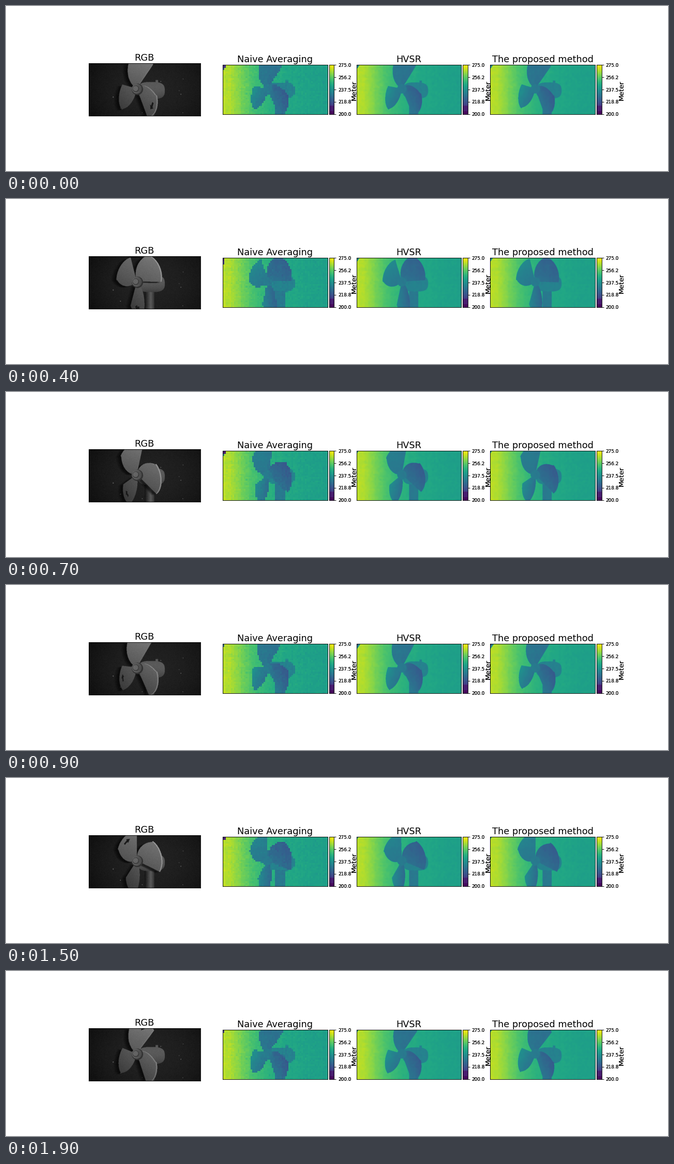
A matplotlib script for the animation above (2000 ms loop, 1280 px wide and 320 px high).

```python
import numpy as np
import matplotlib.pyplot as plt
from matplotlib.animation import FuncAnimation
from matplotlib.path import Path

STAGE_W, STAGE_H = 1280, 320
FRAMES, STEP = 20, 12.8            # frames per loop, degrees turned per frame
CELLS_X, CELLS_Y, SUB = 64, 30, 7  # coarse sensor grid and its subdivision
NX, NY = CELLS_X * SUB, CELLS_Y * SUB
VIEW_W, VIEW_H = 216, 101          # scene units
HUB_X, HUB_Y = 93, 48.7
MID_ANGLE = 81                     # middle of a blade, degrees

gx, gy = np.meshgrid((np.arange(NX) + 0.5) * VIEW_W / NX,
                     (np.arange(NY) + 0.5) * VIEW_H / NY)
GRID = np.column_stack([gx.ravel(), gy.ravel()])


def blade_outline(lead=52, trail=109):
    """Polar outline: straight leading edge, rounded rim, swept trailing edge."""
    r_lead = np.linspace(8, 55, 6)
    rim = np.linspace(lead, trail, 12)
    r_back = np.linspace(56, 10, 8)
    angle = np.concatenate([np.full(6, lead), rim, 104 + 50 * (1 - r_back / 63)])
    r = np.concatenate([r_lead, 63 - 6 * ((rim - 84) / 30) ** 2, r_back])
    return angle, r


def arrow_outline(angle=MID_ANGLE, r=50):
    along = np.array([10, 10, 0, 0, -9, 0, 0])
    across = np.array([-2, 2, 2, 5, 0, -5, -2])
    return angle + along, r + across


def inside(points):
    return Path(points).contains_points(GRID).reshape(NY, NX)


def disc(x, y, r):
    return (gx - x) ** 2 + (gy - y) ** 2 < r * r


def project(outline, turn):
    """Turn a polar outline and view its disc obliquely: x, y, depth, grey."""
    angle, r = outline
    beta = np.radians(angle - turn)
    near = r / 58 * np.cos(beta)
    scale = 1 + 0.1 * near
    pitch = r / 58 * (MID_ANGLE + 7 - angle) * 0.175
    x = HUB_X + 0.68 * scale * r * np.cos(beta) + pitch
    y = HUB_Y - scale * r * np.sin(beta)
    depth = 0.385 - 0.085 * near + 0.006 * pitch
    grey = 88 + r / 58 * (27 * np.sin(beta) + 12 * np.cos(beta))
    return np.column_stack([x, y, depth, grey])


def plane(verts, values):
    """Linear shade over the grid fitted to values at the vertices."""
    basis = np.column_stack([np.ones(len(verts)), verts[:, :2]])
    k = np.linalg.lstsq(basis, values, rcond=None)[0]
    return np.clip(k[0] + k[1] * gx + k[2] * gy, values.min(), values.max())


def grow(a):
    """Bilinear enlargement from sensor cells to the fine grid."""
    for n in (CELLS_X, CELLS_Y):
        pos = (np.arange(n * SUB) + 0.5) / SUB - 0.5
        a = np.array([np.interp(pos, np.arange(n), row) for row in a]).T
    return a


def facing(turn):
    """1 when the blade points to the near side, -1 on the far side."""
    return np.cos(np.radians(MID_ANGLE - turn))


def blades(turn):
    """Blades from far to near, each with its mask, vertices and turn."""
    turns = sorted((turn + 120 * k for k in range(3)), key=facing)
    out = []
    for t in turns:
        verts = project(blade_outline(), t)
        out.append((inside(verts[:, :2]), verts, t))
    return out


motor_mask = np.abs((gx - 121) / 26) ** 3 + np.abs((gy - 52.5) / 16.5) ** 3 < 1
pole_mask = (np.abs(gx - 117.5) < 9.5) & (gy > 60)
knob_mask = (np.abs(gx - 131.5) < 2.5) & (np.abs(gy - 36) < 4)
hub_mask = disc(93, 49, 9.5)

rng = np.random.default_rng(4)
texture = (rng.normal(0, 0.009, (CELLS_Y, CELLS_X))
           + rng.normal(0, 0.004, (CELLS_Y, 1)) + rng.normal(0, 0.004, (1, CELLS_X)))
stars = rng.uniform((5, 15, 60), (212, 96, 160), (9, 3))
across = gx / VIEW_W
wall = 0.565 - 0.02 * across + 0.33 / (1 + (across / 0.27) ** 2.2)
room = 34 - 15 * ((gx - 118) / 118) ** 2 - 5 * ((gy - 50) / 50) ** 2


def depth_map(turn):
    d = wall.copy()
    d[pole_mask] = 0.40
    d[motor_mask | knob_mask] = 0.44
    for mask, verts, _ in blades(turn):
        d[mask] = plane(verts, verts[:, 2])[mask]
    d[hub_mask] = 0.41
    return d


def camera(turn):
    parts = blades(turn)
    shadow = sum(0.25 * np.roll(mask, (5, -s), axis=(0, 1))
                 for mask, _, _ in parts for s in (8, 12, 16, 20))
    shade = 1 - 0.6 * np.clip(shadow, 0, 1)
    g = room.copy()
    for x, y, level in stars:
        g[disc(x, y, 0.8)] = level
    g[pole_mask] = (90 - 6 * np.abs(gx - 120))[pole_mask]
    g[motor_mask | knob_mask] = (90 - 0.045 * (gy - 44) ** 2)[motor_mask | knob_mask]
    g *= shade
    for mask, verts, t in parts:
        g[mask] = plane(verts, verts[:, 3])[mask]
        rim = mask & ~np.roll(mask, -5, axis=1)
        g[rim] += 45 * max(0, facing(t))
    g[inside(project(arrow_outline(), turn + 120)[:, :2])] = 24
    g[disc(94, 50, 11)] = 50
    g[hub_mask] = (95 - 1.8 * (gx - 90))[hub_mask]
    g[disc(91, 49, 6.5)] = 62
    g[disc(90.5, 48.5, 5)] = 100
    return g


def render(i):
    turn = STEP * i
    rnd = np.random.default_rng(50 + i)
    noise = texture + rnd.normal(0, 0.004, texture.shape)
    photo = camera(turn + 1) + rnd.normal(0, 4, (NY, NX))

    # the three depth methods lag the camera by different amounts
    sharp, later = depth_map(turn - 2), depth_map(turn + 2)
    cells = sharp.reshape(CELLS_Y, SUB, CELLS_X, SUB)
    naive = np.quantile(cells, 0.3, axis=(1, 3)) + noise
    cols, rows = rnd.integers(1, 3), rnd.integers(2, 5)
    naive[:rows, 0] = rnd.uniform(0.15, 0.5)
    naive[:2, :cols] = rnd.uniform(0.02, 0.35)

    corner = gx + 0.7 * gy
    size = rnd.uniform(3, 9)
    for d in (sharp, later):
        d += 0.75 * grow(noise)
        d[corner < size] = 0.45
        d[corner < size - 4] = 0.2
    return photo, naive, sharp, later


fig = plt.figure(figsize=(16, 4), dpi=80, facecolor="white")
MID, ASPECT, COL = 162, 2.13, 215.65
DEPTH_W, BAR_W = 202.8, 9.9


def add_axes(x, w, h):
    ax = fig.add_axes([x / STAGE_W, 1 - (MID + h / 2) / STAGE_H, w / STAGE_W, h / STAGE_H])
    ax.set_xticks([])
    ax.set_yticks([])
    return ax


def picture(x, w, title, shape, **style):
    ax = add_axes(x, w, w / ASPECT)
    ax.set_title(title, fontsize=16, pad=5)
    return ax.imshow(np.zeros(shape), aspect="auto", **style)


def colour_bar(x, h):
    cax = add_axes(x, BAR_W, h)
    f = np.linspace(0, 1, 256)
    f = np.select([f < 0.06, f < 0.17, f > 0.94], [0.02, 0.08, 0.955], f)
    cax.imshow(f[:, None], cmap="viridis", vmin=0, vmax=1, origin="lower",
               extent=(0, 1, 200, 275), aspect="auto")
    ticks = np.linspace(200, 275, 5)
    cax.yaxis.tick_right()
    cax.set_yticks(ticks, [""] * 5)
    # labels are stacked, which makes them look heavier
    for _ in range(2):
        for v in ticks:
            cax.text(1.75, v, f"{v:.1f}", fontsize=8, va="center_baseline")
        cax.text(5.26, 236.3, "Meter", fontsize=12, rotation=90,
                 rotation_mode="anchor", ha="center", va="baseline")


images = [picture(160, COL, "RGB", (NY, NX), cmap="gray", vmin=0, vmax=255)]
for k, name in enumerate(["Naive Averaging", "HVSR", "The proposed method"], 1):
    left = 160 + 1.2 * COL * k
    shape = (CELLS_Y, CELLS_X) if k == 1 else (NY, NX)
    images.append(picture(left, DEPTH_W, name, shape, cmap="viridis", vmin=0, vmax=1,
                          interpolation="nearest" if k == 1 else "antialiased"))
    colour_bar(left + COL - BAR_W, DEPTH_W / ASPECT)


def update(i):
    for im, data in zip(images, render(i)):
        im.set_data(data)
    return images


anim = FuncAnimation(fig, update, frames=FRAMES, interval=100, repeat=True, repeat_delay=0)
plt.show()
```
